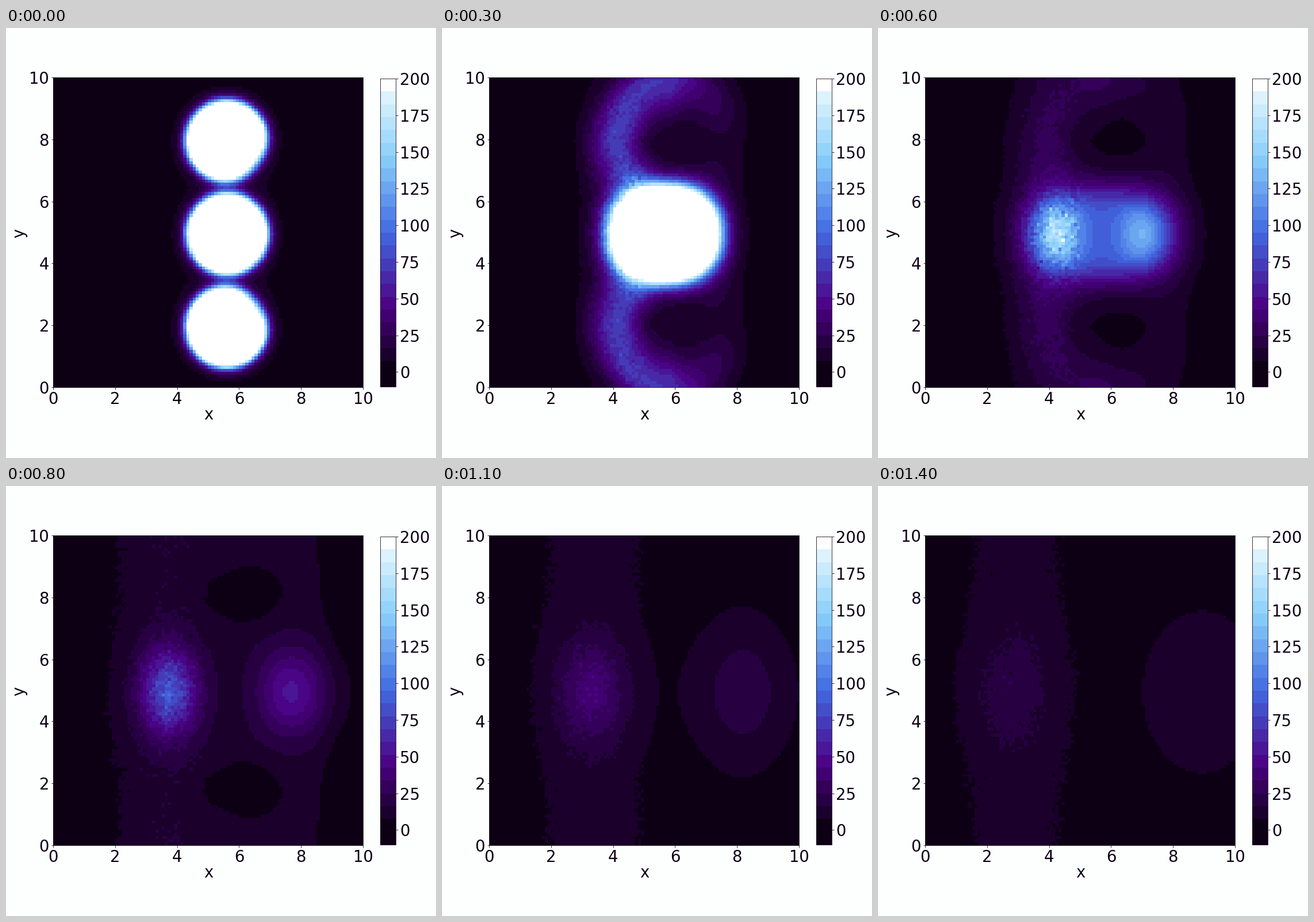
A matplotlib script for the animation above (1500 ms loop, 748x748 px).

```python
import numpy as np
import matplotlib.pyplot as plt
from matplotlib.animation import FuncAnimation
from matplotlib.colors import LinearSegmentedColormap

SIZE, DPI = 748, 88
PT = 72 / DPI            # one pixel in points
DARK, PAPER = "#0d0015", "#fdfefe"
FRAMES, CELLS = 15, 100
FONT = 27.5 * PT

plt.rcParams.update({
    "font.family": "DejaVu Sans",
    "text.color": DARK,
    "axes.edgecolor": DARK,
    "axes.linewidth": 0.8 * PT,
    "xtick.color": DARK,
    "ytick.color": DARK,
})

# Cell centres; the field is mirrored about y = 4.95, so V is the distance to it.
axis = (np.arange(CELLS) + 0.5) * 10 / CELLS
X, Y = np.meshgrid(axis, axis)
V = np.abs(Y - 4.95)


def bump(x, v, sx, sv):
    return np.exp(-((X - x) / sx) ** 2 / 2 - ((V - v) / sv) ** 2 / 2)


def column(x, s, power=2):
    return np.exp(-np.abs((X - x) / s) ** power)


def blob(x, v, rx, rv, soft, peak=400, power=2.0):
    """Plateau with an exponential skirt that crosses 195 on its outline."""
    rho = (np.abs((X - x) / rx) ** power + np.abs((V - v) / rv) ** power) ** (1 / power)
    return peak / (1 + (peak / 195 - 1) * np.exp((rho - 1) / soft))


def disc(x, v, r, soft):
    return blob(x, v, r, r, soft / r)


def arc(gain, radius, outer):
    """Open ring around the hole, strong on the left and fading to the right."""
    dx, dv = 5.9 - X, V - 3
    r, phi = np.hypot(dx, dv), np.arctan2(dv, dx)
    amp = np.exp(np.interp(phi, [-np.pi, -1.6, -0.8, 0, 1.57, 2.2, 2.65, np.pi],
                           np.log([7, 10, 58, 66, 60, 25, 17, 7])))
    up = np.clip(np.sin(phi), 0, 1)
    gap = r - radius - 0.25 * up ** 2
    width = np.where(gap < 0, 0.5 + 0.25 * up, outer - 0.2 * up)
    return gain * amp * np.exp(-(gap / width) ** 2 / 2)


def discs():
    dent = np.exp(-0.7 * bump(6.85, 2.05, 0.6, 0.6))
    halo = 12 * (bump(5.65, 0, 1.2, 1.2) + bump(5.65, 3, 1.2, 1.2))
    return disc(5.62, 0, 1.25, 0.11) + disc(5.6, 3, 1.25, 0.11) * dent + halo


def hooks():
    bite = np.exp(-2.0 * bump(5.9, 2.87, 0.45, 0.45) - 2.3 * bump(6.7, 2.35, 0.55, 0.6))
    halo = 13 * (bump(5.65, 0, 1.4, 1.4) + bump(5.65, 3, 1.4, 1.4) * bite ** 0.4)
    return disc(5.65, 0, 1.43, 0.17) + disc(5.6, 3, 1.36, 0.17) * bite + halo


def arcs_wide():
    core = blob(5.65, 0, 1.75, 1.52, 0.145, 900, 2.25)
    haze = 8 * column(5.55, 2.65, 6) * (1 - 0.12 * bump(5.9, 3, 0.15, 0.15))
    return core + arc(1, 1.75, 0.62) + haze


def arcs_faint():
    core = blob(5.67, 0, 1.87, 1.39, 0.175, 600, 2.35)
    haze = 7 * column(5.6, 2.75, 6) + 6 * bump(4, 0, 1, 2)
    return core + arc(0.66, 1.86, 0.66) + haze


def lobes_bright():
    q = ((X - 6.1) / 1.4) ** 2 + ((V - 3.1) / 1.15) ** 2
    band = (12 + 3.5 * (V / 5) ** 2) * column(3.8, 1.98) + 9.5 * column(7, 1.9, 6)
    band = band * (1 - 0.7 * np.exp(-q ** 2)) * (1 - 0.5 * np.exp(-(V / 1.6) ** 2))
    left = 70 * bump(3.75, 0, 0.66, 0.96) + 9 * bump(3.5, 0, 1.4, 1.5)
    right = 36 * bump(7.65, 0, 0.75, 0.95) + 13 * bump(8.1, 0, 1.25, 1.3)
    return band + left + right


def lobes_dim():
    left = 32 * bump(3.4, 0, 0.75, 1.1) + 5 * bump(3.4, 0, 1.3, 1.5)
    band = 11.5 * column(3.45, 2.1) + 10 * bump(7.6, 5.4, 1.3, 1.2)
    return left + band + 24 * bump(8.05, 0, 1.15, 1.75)


def lobes_last():
    left = 11 * bump(2.8, 0, 1.05, 1.5) + 10 * column(2.95, 2.25)
    return left + 15.6 * bump(8.95, 0, 1.5, 2.1)


STAGES = [(0, discs), (1, hooks), (3, arcs_wide), (4, arcs_faint),
          (8, lobes_bright), (10, lobes_dim), (14, lobes_last)]
TIMES = [t for t, _ in STAGES]
LOGS = [np.log(make() + 0.3) for _, make in STAGES]


def field(t):
    """Geometric blend of stages: peaks drift and decay exponentially."""
    k = min(np.searchsorted(TIMES, t, side="right") - 1, len(TIMES) - 2)
    mix = (t - TIMES[k]) / (TIMES[k + 1] - TIMES[k])
    value = np.exp((1 - mix) * LOGS[k] + mix * LOGS[k + 1])
    grain = np.random.default_rng(100 + t).normal(0, min(0.08, 0.025 + 0.008 * t), X.shape)
    return value * (1 + grain * (X < 5.05))


def box(left, top, width, height):
    return [left / SIZE, 1 - (top + height) / SIZE, width / SIZE, height / SIZE]


cmap = LinearSegmentedColormap.from_list("glow", [
    (0, DARK), (1 / 23, DARK), (0.25, "indigo"), (0.5, "royalblue"),
    (0.75, "lightskyblue"), (22 / 23, "#dcf3fd"), (1, "white")], N=24)

fig = plt.figure(figsize=(SIZE / DPI, SIZE / DPI), dpi=DPI, facecolor=PAPER)
ax = fig.add_axes(box(82, 86, 539, 539))
cax = fig.add_axes(box(651, 88, 27, 536))

image = ax.imshow(field(0), cmap=cmap, vmin=-10, vmax=200, origin="lower",
                  extent=(0, 10, 0, 10), interpolation="nearest", aspect="auto")
ax.set_xticks(range(0, 11, 2))
ax.set_yticks(range(0, 11, 2))
bar = fig.colorbar(image, cax=cax, ticks=range(0, 201, 25))
bar.outline.set_linewidth(0.8 * PT)
for a in (ax, cax):
    a.tick_params(labelsize=FONT, length=3.5 * PT, width=0.8 * PT, pad=3.5 * PT)

fig.text(352 / SIZE, 1 - 681 / SIZE, "x", fontsize=FONT, ha="center", va="baseline")
fig.text(31.5 / SIZE, 1 - 357 / SIZE, "y", fontsize=FONT, ha="center", va="baseline",
         rotation=90, rotation_mode="anchor")


def draw(i):
    image.set_data(field(i))
    return [image]


anim = FuncAnimation(fig, draw, frames=FRAMES, interval=100, repeat=True, blit=False)
plt.show()
```
